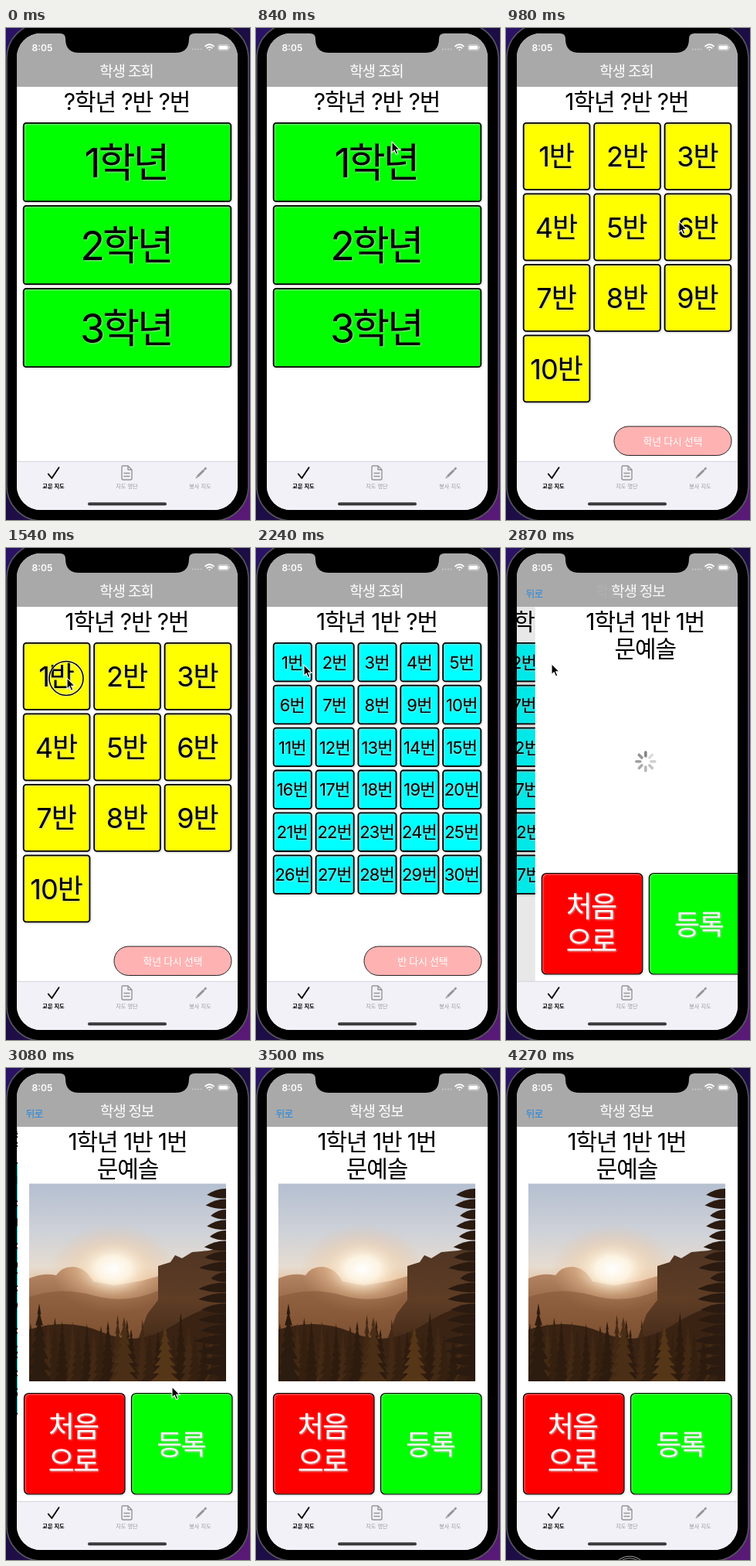
These frames come from a looping animation (316 px wide and 636 px high, 4.34 s). An HTML page:

```html
<!DOCTYPE html>
<html lang="ko">
<head>
<meta charset="utf-8">
<title>학생 조회</title>
<style>
html, body { margin: 0; width: 100%; height: 100%; overflow: hidden; background: #000; }
svg { display: block; width: 100vw; height: 100vh; }
text { font-family: Inter, "Noto Sans CJK KR", "Noto Sans CJK", sans-serif; text-anchor: middle; white-space: pre; }
.raised { filter: drop-shadow(1.6px 1.6px .8px rgba(196, 196, 196, .9)); }
</style>
</head>
<body>
<svg viewBox="0 0 316 636" preserveAspectRatio="none">
  <defs>
    <linearGradient id="wall" x1="0" y1="0" x2="1" y2="1">
      <stop offset="0" stop-color="#2a1266"/><stop offset=".5" stop-color="#1c0d45"/><stop offset="1" stop-color="#5a1a78"/>
    </linearGradient>
    <linearGradient id="sky" x1="0" y1="0" x2="0" y2="1">
      <stop offset="0" stop-color="#b4bfd0"/><stop offset=".25" stop-color="#cfd2d8"/>
      <stop offset=".42" stop-color="#e6dcd0"/><stop offset=".55" stop-color="#e3b48c"/>
    </linearGradient>
    <linearGradient id="hill" x1="0" y1="0" x2="0" y2="1">
      <stop offset="0" stop-color="#b98a68"/><stop offset=".45" stop-color="#8a5c3c"/><stop offset="1" stop-color="#3c2413"/>
    </linearGradient>
    <linearGradient id="cliff" x1="0" y1="0" x2="0" y2="1">
      <stop offset="0" stop-color="#4f3523"/><stop offset=".4" stop-color="#5f3d25"/><stop offset="1" stop-color="#2c1a0e"/>
    </linearGradient>
    <radialGradient id="glow">
      <stop offset="0" stop-color="#fff"/><stop offset=".28" stop-color="#fff6e4" stop-opacity=".9"/>
      <stop offset=".6" stop-color="#f6cfa4" stop-opacity=".4"/><stop offset="1" stop-color="#e9b184" stop-opacity="0"/>
    </radialGradient>
    <clipPath id="screen"><rect x="14" y="7" width="286" height="616" rx="31"/></clipPath>
    <clipPath id="body"><rect x="14" y="76" width="286" height="484"/></clipPath>
    <clipPath id="frame"><rect x="29" y="149.500" width="255" height="255.500"/></clipPath>
  </defs>
  <rect width="316" height="636" fill="url(#wall)"/>
  <rect x="1" y="-6" width="313" height="643" rx="45" fill="#000" stroke="#55555c" stroke-width="1.600"/>
  <g clip-path="url(#screen)">
    <rect x="14" y="7" width="286" height="616" fill="#fff"/>
    <g clip-path="url(#body)">
      <g id="list"></g>
      <rect id="dim" x="14" y="76" width="286" height="484"/>
      <g id="info"></g>
    </g>
    <g id="bars"></g>
  </g>
  <path d="M70 0V7q7 0 7 7q0 18 18 18H219q18 0 18 -18q0 -7 7 -7V0z"/>
  <g id="pointer">
    <g id="ring" fill="none">
      <circle cx="-1" cy=".5" r="22" stroke="#fff" stroke-opacity=".6" stroke-width="3.400"/>
      <circle cx="-1" cy=".5" r="22" stroke="#000" stroke-width="1.600"/>
    </g>
    <path d="M0 0V14.200L3.200 11.200L5.500 16.500L7.900 15.500L5.700 10.400H10.200Z" stroke="#fff" stroke-width="1.100"/>
  </g>
</svg>
<script>
const $ = id => document.getElementById(id);
const LOOP = 4340, STEP = 70, WIDTH = 286;

const text = (s, x, y, size, gap = 0, fill = '#000', extra = '') =>
  `<text x="${x + gap / 2}" y="${y}" font-size="${size}" letter-spacing="${gap}" fill="${fill}" ${extra}>${s}</text>`;

const button = (x, y, w, h, r, fill, label, line = 1.8) =>
  `<rect x="${x}" y="${y}" width="${w}" height="${h}" rx="${r}" fill="${fill}"/>
   <g class="raised"><rect x="${x}" y="${y}" width="${w}" height="${h}" rx="${r}" fill="none" stroke="#000" stroke-width="${line}"/>${label}</g>`;

// Fills a grid of numbered buttons between x = 22 and x = 292.
function grid({ count, cols, height, pitch, fill, unit, size, gap }) {
  const w = (270 - 4.3 * (cols - 1)) / cols;
  let out = '';
  for (let i = 0; i < count; i++) {
    const x = 22.7 + (i % cols) * (w + 4.3);
    const y = 122.8 + Math.floor(i / cols) * pitch;
    const label = text(i + 1 + unit, x + w / 2 - .7, y + height / 2 + size * .37, size, gap);
    out += button(x, y, w - 1.4, height, 3.5, fill, label);
  }
  return out;
}

const heading = (s, y = 106) => text(s, 157, y, 30, -1.1);

const again = s =>
  `<rect x="140" y="515" width="152" height="37.500" rx="18.700" fill="#ffb2b2" stroke="#222" stroke-width="1"/>` +
  text(s, 216, 538.5, 13, -.3, '#fff');

const views = {
  grade: heading('?학년 ?반 ?번') +
    grid({ count: 3, cols: 1, height: 101.4, pitch: 107, fill: '#0f0', unit: '학년', size: 52, gap: -3 }),
  group: heading('1학년 ?반 ?번') +
    grid({ count: 10, cols: 3, height: 86, pitch: 91.5, fill: '#ff0', unit: '반', size: 36, gap: -1 }) +
    again('학년 다시 선택'),
  seat: heading('1학년 1반 ?번') +
    grid({ count: 30, cols: 5, height: 49.6, pitch: 54.9, fill: '#0ff', unit: '번', size: 22, gap: -.8 }) +
    again('반 다시 선택')
};
$('list').innerHTML = Object.entries(views).map(([id, s]) => `<g id="${id}">${s}</g>`).join('');

function tree(x, top, base, w, fill) {
  const n = 7, left = [], right = [];
  for (let i = 0; i <= n; i++) {
    const y = top + (base - top) * i / n, r = w * i / n;
    left.unshift(`${x - r * .45} ${y}`, `${x - r} ${y}`);
    right.push(`${x + r} ${y}`, `${x + r * .45} ${y}`);
  }
  return `<path d="M${x} ${top}L${right.join('L')}L${left.join('L')}Z" fill="${fill}"/>`;
}

function landscape() {
  let seed = 11;
  const rnd = () => (seed = seed * 16807 % 2147483647) / 2147483647;
  let s = `<rect x="29" y="149" width="255" height="256" fill="url(#sky)"/>
    <path d="M29 272Q48 264 64 268Q72 256 87 257Q103 259 112 276L140 281L175 275L200 268V405H29Z" fill="url(#hill)"/>
    <ellipse cx="138" cy="260" rx="80" ry="58" fill="url(#glow)"/>
    <path d="M29 296Q70 282 112 294T196 288V405H29Z" fill="#855636" opacity=".55"/>
    <path d="M196 256L212 251L218 242L227 246L240 238L262 236L284 230V405H150L182 318L196 300Z" fill="url(#cliff)"/>
    <path d="M29 338Q80 322 125 342T220 330T284 318V405H29Z" fill="#3a2313"/>`;
  for (let i = 0; i < 26; i++) {
    const x = 31 + i * 10 + rnd() * 5, top = 316 + rnd() * 30;
    s += tree(x, top, 405, 8 + rnd() * 5, ['#352010', '#2d1b0e', '#432914'][i % 3]);
  }
  s += tree(42, 304, 405, 17, '#2c1b0f') + tree(152, 322, 405, 18, '#4a2f16') + tree(205, 334, 405, 19, '#553718');
  // Branches of the near tree reach in from the right edge.
  for (let i = 0; i < 18; i++) {
    const y = 161 + i * 13.5, reach = 18 + rnd() * 18 + (i > 11 ? 8 : 0);
    s += `<path d="M286 ${y - 5}Q${284 - reach * .5} ${y - 6} ${284 - reach} ${y + 3}Q${284 - reach * .4} ${y + 9} 286 ${y + 7}Z" fill="#2a1a10"/>`;
  }
  return s;
}

const spokes = Array.from({ length: 8 }, (_, i) =>
  `<path d="M0 -7V-12" transform="rotate(${i * 45})" stroke="#555" stroke-width="3.600" stroke-linecap="round"/>`).join('');

$('info').innerHTML = `<rect x="14" y="76" width="286" height="484" fill="#fff"/>` +
  heading('1학년 1반 1번') + heading('문예솔', 141) +
  `<g id="spin" transform="translate(157 276)">${spokes}</g>
   <g id="photo" clip-path="url(#frame)">${landscape()}</g>` +
  button(22.5, 420.5, 130.5, 130.5, 6, '#f00',
    text('처음', 87, 477, 37, -1.8, '#fff') + text('으로', 87, 522, 37, -1.8, '#fff'), 1.2) +
  button(161.5, 420.5, 130.5, 130.5, 6, '#0f0', text('등록', 226.5, 500, 36, -1.8, '#f4f4f4'), 1.2);

const tab = (s, x, fill, weight) => text(s, x, 594.5, 7.2, 0, fill, `font-weight="${weight}"`);

$('bars').innerHTML = `<rect x="14" y="7" width="286" height="69" fill="#a9a9a9"/>
  <g id="oldTitle">${text('학생 조회', 156.5, 63, 19, -1.2, '#fff')}</g>
  <g id="newTitle">${text('학생 정보', 156.5, 63, 19, -1.2, '#fff')}</g>
  <g id="back">${text('뒤로', 37, 63.5, 12.5, -.5, '#1c86e4')}</g>
  ${text('8:05', 47, 29.5, 12, 0, '#fff', 'font-weight="600"')}
  <g fill="#fff" fill-opacity=".4">${[242, 245.5, 249, 252.5].map(x => `<circle cx="${x}" cy="27.500" r=".9"/>`).join('')}</g>
  <g fill="none" stroke="#fff" stroke-width="1.700">
    <path d="M257.500 24Q263.500 18.500 269.500 24M259.800 26.400Q263.500 23 267.200 26.400"/>
    <path d="M262 28L263.500 29.300L265 28Q263.500 26.800 262 28Z" fill="#fff" stroke="none"/>
  </g>
  <rect x="274.500" y="21.500" width="14" height="7.500" rx="2.200" fill="none" stroke="#fff" stroke-opacity=".5" stroke-width=".8"/>
  <rect x="275.700" y="22.700" width="11.600" height="5.100" rx="1.200" fill="#fff"/>
  <path d="M289.600 24v2.600" stroke="#fff" stroke-opacity=".6"/>
  <rect x="14" y="560" width="286" height="63" fill="#f2f1f8"/>
  <path d="M14 560.300H300" stroke="#c9c8ce" stroke-width=".7"/>
  <g fill="none" stroke-linecap="round" stroke-linejoin="round">
    <path d="M54.800 576.500L59.300 582L68.500 568.300" stroke="#000" stroke-width="1.900"/>
    <path d="M151.500 566H158L163 571V582Q163 584 161 584H152Q150 584 150 582V567.500Q150 566 151.500 566ZM158 566V571H163M153 575.500H160M153 579.500H160" stroke="#969696" stroke-width="1.400"/>
    <path d="M248 579.800L256.300 571.500" stroke="#969696" stroke-width="3" stroke-linecap="butt"/>
    <path d="M257.600 570.200L258.500 569.300" stroke="#969696" stroke-width="2.800"/>
    <path d="M246.800 579.200L245.300 582.500L248.700 581Z" fill="#969696"/>
  </g>
  ${tab('교문 지도', 61.5, '#000', 600)}${tab('지도 명단', 156.5, '#999', 400)}${tab('봉사 지도', 251.5, '#999', 400)}
  <rect x="106" y="613.300" width="102" height="4" rx="2" fill="#3a3a3c"/>`;

// Pointer path: time, x, y.
const path = [
  [0, 162, 660], [560, 175, 153], [700, 176, 147], [840, 176, 147], [980, 224, 250],
  [1050, 224, 250], [1470, 80, 169], [1540, 79, 168], [1680, 79, 168], [1820, 147, 299],
  [2030, 147, 299], [2240, 62, 151], [2310, 59, 149.5], [2870, 59, 149.5], [3080, 215, 412],
  [3220, 210, 560], [3500, 242, 650], [4200, 161, 654], [4340, 161, 654]
];
const taps = [[700, 840], [1540, 1680], [2450, 2590], [4270, 4340]];

function pointerAt(t) {
  const i = path.findIndex(k => k[0] > t);
  const [t0, x0, y0] = path[i - 1], [t1, x1, y1] = path[i];
  const u = (t - t0) / (t1 - t0), e = u * u * (3 - 2 * u);
  return [x0 + (x1 - x0) * e, y0 + (y1 - y0) * e];
}

const show = (id, on) => $(id).setAttribute('display', on ? 'inline' : 'none');
const shift = (id, x, y = 0) => $(id).setAttribute('transform', `translate(${x} ${y})`);
const fade = (id, a) => $(id).setAttribute('opacity', a);

function draw(t) {
  show('grade', t < 910);
  show('group', t >= 910 && t < 1750);
  show('seat', t >= 1750);

  const pushing = t >= 2730;
  const off = !pushing ? WIDTH : t > 3220 ? 0 : WIDTH * Math.exp((2706 - t) / 66);
  const p = 1 - off / WIDTH;
  show('info', pushing);
  shift('info', off);
  shift('list', -.3 * WIDTH * p);
  fade('dim', .1 * p);
  shift('oldTitle', -6 * p);
  fade('oldTitle', 1 - p);
  shift('newTitle', off * .63);
  fade('newTitle', p);
  fade('back', p);

  show('photo', t >= 3010);
  show('spin', t < 3010);
  const turn = Math.floor((t - 2870) / 100) + 80;
  [...$('spin').children].forEach((s, i) => s.setAttribute('opacity', .72 - .075 * ((turn - i) % 8)));

  shift('pointer', ...pointerAt(t));
  show('ring', taps.some(([a, b]) => t >= a && t < b));
}

const start = performance.now();
function tick() {
  const t = (performance.now() - start) % LOOP;
  draw(Math.floor(t / STEP) * STEP);
  requestAnimationFrame(tick);
}
tick();
</script>
</body>
</html>
```
